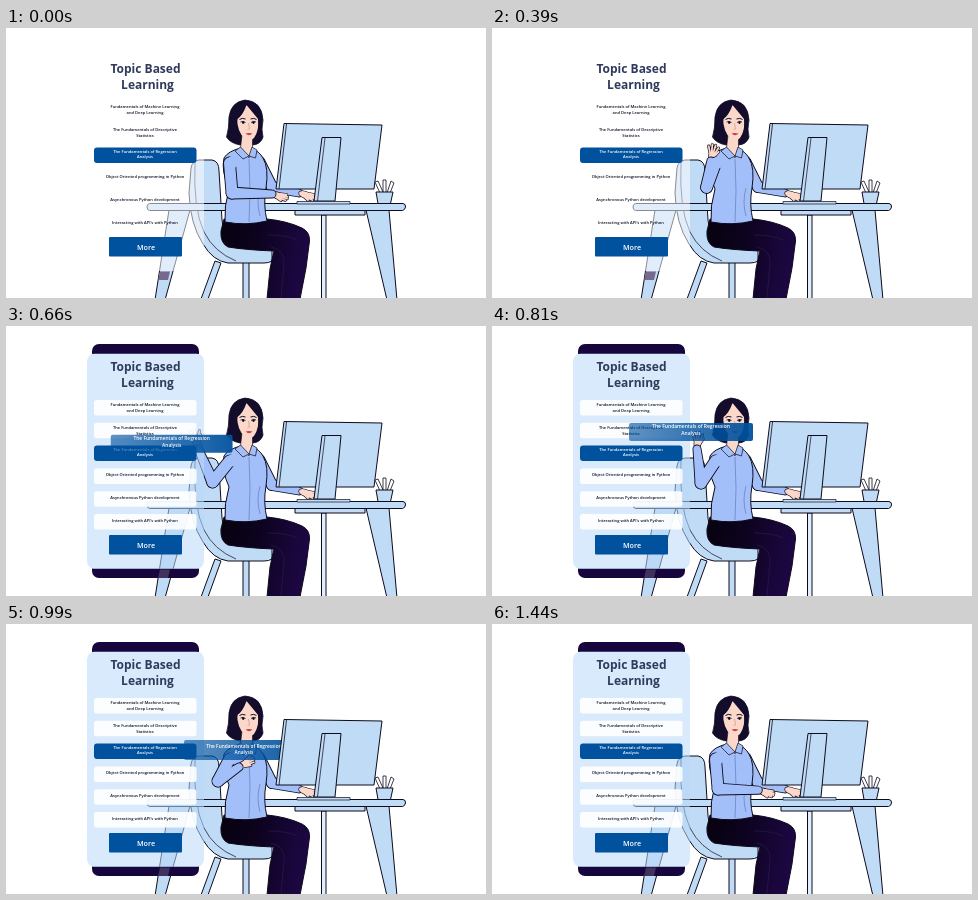
An HTML page with a canvas that plays this animation: 480x270 px, repeating every 1470 ms.

```html
<!DOCTYPE html>
<html lang="en">
<head>
<meta charset="utf-8">
<style>
html, body { margin: 0; width: 100%; height: 100%; overflow: hidden; background: #fff; }
canvas { display: block; width: 480px; height: 270px; }
</style>
</head>
<body>
<canvas></canvas>
<script>
const LOOP = 1470, STEP = 30;
const INK = '#0d0b1c', PALE = '#c0dbf6', SHIRT = '#a3bffa', SKIN = '#fcd8ca';
const HAIR = '#130c2b', PHONE = '#17053d', BLUE = '#00519e';
const FONT = '"Open Sans", "Noto Sans", sans-serif';

const canvas = document.querySelector('canvas');
const ctx = canvas.getContext('2d');
const ratio = window.devicePixelRatio || 1;
canvas.width = 480 * ratio;
canvas.height = 270 * ratio;

const PANTS = ctx.createLinearGradient(215, 200, 300, 215);
PANTS.addColorStop(0, '#07020f');
PANTS.addColorStop(.45, '#0d031f');
PANTS.addColorStop(1, '#1c0742');

// time, elbow x/y, wrist x/y, fingertip x/y, finger spread
const ARM = [
  [0, 226, 165, 266, 166, 282, 170, .08],
  [240, 223, 163, 249, 142, 265, 131, .12],
  [540, 207, 156, 193, 127, 185, 107, .3],
  [810, 209, 157, 205, 123, 206, 106, .2],
  [990, 212, 157, 233, 143, 248, 134, .12],
  [1140, 223, 164, 252, 156, 269, 150, .08],
  [1380, 226, 165, 266, 166, 282, 170, .08],
  [1470, 226, 165, 266, 166, 282, 170, .08]
];
// time, x, y, width, height
const BANNER = [
  [480, 88, 119, 103, 16],
  [540, 79, 118, 120, 18],
  [810, 137, 97, 124, 18],
  [990, 178, 116, 120, 20],
  [1140, 241, 136, 30, 16],
  [1230, 274, 148, 4, 4]
];
const ROWS = [
  ['Fundamentals of Machine Learning', 'and Deep Learning'],
  ['The Fundamentals of Descriptive', 'Statistics'],
  ['The Fundamentals of Regression', 'Analysis'],
  ['Object Oriented programming in Python'],
  ['Asynchronous Python development'],
  ["Interacting with API's with Python"]
];

function pose(keys, t, smooth) {
  let i = 0;
  while (i < keys.length - 2 && t >= keys[i + 1][0]) i++;
  const a = keys[i], b = keys[i + 1];
  const before = keys[Math.max(i - 1, 0)], after = keys[Math.min(i + 2, keys.length - 1)];
  const span = b[0] - a[0], u = (t - a[0]) / span;
  return a.slice(1).map((p, k) => {
    const q = b[k + 1];
    if (!smooth) return p + (q - p) * u;
    const m = (q - before[k + 1]) / (b[0] - before[0]) * span * (i > 0);
    const n = (after[k + 1] - p) / (after[0] - a[0]) * span;
    return p + u * (m + u * (3 * (q - p) - 2 * m - n + u * (2 * (p - q) + m + n)));
  });
}

function shape(d, fill, stroke = INK, width = 1) {
  const path = new Path2D(d);
  if (fill) { ctx.fillStyle = fill; ctx.fill(path); }
  if (stroke) { ctx.strokeStyle = stroke; ctx.lineWidth = width; ctx.stroke(path); }
}

function box(x, y, w, h, r, fill) {
  ctx.beginPath();
  ctx.roundRect(x, y, w, h, r);
  ctx.fillStyle = fill;
  ctx.fill();
}

function dot(x, y, rx, ry, fill) {
  ctx.beginPath();
  ctx.ellipse(x, y, rx, ry, 0, 0, 7);
  ctx.fillStyle = fill;
  ctx.fill();
}

function text(str, x, y, size, color, weight = 400) {
  ctx.font = `${weight} ${size}px ${FONT}`;
  ctx.textAlign = 'center';
  ctx.textBaseline = 'alphabetic';
  ctx.fillStyle = color;
  ctx.fillText(str, x, y);
}

function lines(rows, x, mid, size, color) {
  const gap = size * 1.37;
  rows.forEach((row, i) =>
    text(row, x, mid + size * .33 + (i - (rows.length - 1) / 2) * gap, size, color, 600));
}

// Tapered capsule between two joints
function limb(x1, y1, r1, x2, y2, r2) {
  const a = Math.atan2(y2 - y1, x2 - x1), h = Math.PI / 2;
  const path = new Path2D();
  path.arc(x1, y1, r1, a + h, a - h);
  path.arc(x2, y2, r2, a - h, a + h);
  path.closePath();
  return path;
}

function sleeve(parts) {
  ctx.strokeStyle = INK;
  ctx.lineWidth = 1.8;
  parts.forEach(p => ctx.stroke(p));
  ctx.fillStyle = SHIRT;
  parts.forEach(p => ctx.fill(p));
}

function hand(wx, wy, tx, ty, spread) {
  const a = Math.atan2(ty - wy, tx - wx), len = Math.hypot(tx - wx, ty - wy);
  ctx.save();
  ctx.translate(wx, wy);
  ctx.rotate(a);
  ctx.lineCap = 'round';
  for (const [color, grow] of [[INK, 1.3], [SKIN, 0]]) {
    ctx.strokeStyle = color;
    ctx.lineWidth = 1.8 + grow;
    ctx.beginPath();
    for (let i = -1.5; i < 2; i++) {
      ctx.moveTo(len * .4, i * 1.3);
      ctx.lineTo(len * (1 - Math.abs(i) * .08) * Math.cos(i * spread),
                 i * 1.1 + len * .6 * Math.sin(i * spread));
    }
    ctx.moveTo(len * .2, 1.5);
    ctx.lineTo(len * .62, 3.2 + spread * 12);
    ctx.stroke();
    dot(len * .28, 0, len * .34 + grow / 2, 3 + grow / 2, color);
  }
  ctx.restore();
}

function chair() {
  shape('M209 233 L195 271 H202 L215 235Z', PALE);
  shape('M237 234 V271 H243 V234Z', PALE);
  shape('M185 140 Q186 133 193 132 H206 Q213 133 213 143 L216 192 Q218 216 232 220 H266 V233 Q263 235 258 235 H222 Q207 233 197 216 Q184 196 183 165Z', PALE);
  shape('M189 134 Q187 181 198 204 Q208 224 230 233', null, INK, .7);
}

function desk() {
  shape('M163 182 H184 L159 272 H149Z', PALE);
  shape('M360 182 H383 L391 272 H381Z', PALE);
  shape('M315.5 187 V271 H320 V187Z', '#e1effc');
  shape('M289 182 H359 V187 H289Z', PALE);
  shape('M143.500 175.500 H397 Q400 176 399.500 179 Q399 182 396.500 182.500 H143.500 Q141 182 141 179 Q141 176 143.500 175.500Z', PALE);
}

function body() {
  shape('M218 191 H261 Q281 193 296 200 Q304 204 303.500 213 L300 240 L294 271 H261 L264 241 Q266 231 268 223 Q241 222 222 219 Q214 215 215 203Z', PANTS, INK);
  shape('M265 219 Q279 222 278 236 L275 270 M262 207 Q281 207 291 212', null, '#2b1a4a', .7);

  sleeve([limb(253, 134, 5.5, 266, 159, 5), limb(266, 159, 5, 293, 165, 3.5)]);
  hand(294, 165, 309, 170, .08);

  shape('M235 120 Q222 123 218 130 Q215 143 223 161 Q218 178 219 194 Q240 198 261 193 Q257 176 260 160 Q263 140 257 130 Q253 123 246 121Z', SHIRT);
  shape('M243 131 Q245 162 243 194 M254 160 Q250 174 254 188', null, '#5b6fae', .6);
}

function head() {
  shape('M239 72 Q225 74 223 89 Q223 101 220.500 109 Q224 115 234 117 H247 Q255 116 257 109 Q255 102 257 92 Q256 73 239 72Z', HAIR, HAIR, .8);
  shape('M236 107 L234.500 120 L243 130 L246.500 121 L246.500 108Z', SKIN, INK, .6);
  shape('M231 88 Q232 77 242 77 Q252 79 252.500 91 Q253 103 248 110 Q243.500 114.500 239 110.500 Q231 105 231 88Z', SKIN, null);
  shape('M240.500 77 Q237 87 231.500 91 Q229 99 232 111 L223 112 L224 87 Q230 73 240 73 Q255 75 256 91 L255 111 L250 111 Q253 100 252 91 Q248 86 240.500 77Z', HAIR, null);
  shape('M233.500 91.500 Q236 89.500 239.500 91 M244.500 91 Q248 89.500 250.500 91.500', null, HAIR, 1);
  shape('M234.500 94 Q237 92.500 239.500 94.500 M245 94.500 Q247.500 92.500 250 94', null, INK, .8);
  dot(237.2, 94.6, 1.2, 1.3, INK);
  dot(247.5, 94.6, 1.2, 1.3, INK);
  shape('M242.500 95 L243.500 101 L241.500 101.500', null, '#c08d80', .6);
  shape('M239.500 105.500 Q243 104.500 246.500 105.500 Q243 109 239.500 105.500Z', '#cf3b47', null);
  shape('M234.500 119 L229 123 L237 131 L243 128Z M246 119 L251 122 L249.500 130 L243 128Z', SHIRT, INK, .7);
}

function arm(t) {
  const [ex, ey, wx, wy, tx, ty, spread] = pose(ARM, t, true);
  hand(wx, wy, tx, ty, spread);
  sleeve([limb(223.500, 135, 5.5, ex, ey, 5.5), limb(ex, ey, 5.5, wx, wy, 3.6)]);
  dot(226, 134.500, 6, 6, SHIRT);
}

function computer() {
  shape('M278 95.500 L376 97 L368 161 L270 161Z', PALE);
  shape('M280.500 96 L273 161', null, INK, .8);
  shape('M316 109.500 H335 L329 173 H308Z', PALE);
  shape('M319 110 L311.500 173', null, INK, .7);
  shape('M291 173.500 H344 V176 H291Z', PALE, INK, .7);
  shape('M374 165 L369 154 L372 153 L377 164 M377 165 V152 H380 V165 M381 165 L385 153 L388 155 L384 165', '#fff', INK, .8);
  shape('M370 164 H387 L384.500 175.500 H372Z', PALE);
}

function phone(t) {
  const lit = t >= 555, outlined = t >= 480 && !lit;
  if (lit) {
    box(86, 18, 107, 10, [7, 7, 0, 0], PHONE);
    box(86, 242.500, 107, 9.500, [0, 0, 7, 7], PHONE);
  }
  shape('M154 243.500 H164 L162 252 H152Z', lit ? '#40325f' : '#75698e', null);
  box(81, 27.500, 117, 215.500, 8, lit ? 'rgba(186,217,248,.56)' : 'rgba(255,255,255,.52)');
  if (outlined) {
    shape('M86.500 27 V24 Q87 19.500 92 19.500 H187 Q192.500 19.500 193 24 V27 M86.500 244 V247 Q87 251.500 92 251.500 H187 Q192.500 251.500 193 247 V244', null, PHONE, .8);
    shape('M89 28.500 Q81.500 28.500 81.500 36 V234 Q81.500 242 89 242 M190 28.500 Q197.500 28.500 197.500 36 V234 Q197.500 242 190 242', null, '#d9e6f5', .7);
  }
  text('Topic Based', 139.5, 45.3, 12, '#303b5c', 700);
  text('Learning', 141.5, 60.8, 12, '#303b5c', 700);
  ROWS.forEach((rows, i) => {
    const y = 74 + i * 22.8, active = i === 2;
    if (active) box(88, 119.5, 102.5, 15.5, 3, BLUE);
    else if (lit) box(88, y, 102.5, 15.5, 2.5, 'rgba(255,255,255,.9)');
    const mid = active ? 126 : y + (rows.length > 1 ? 7.8 : 6.3);
    lines(rows, 139, mid, 4.05, active ? '#fff' : '#0c1122');
  });
  box(103, 209, 73, 19.500, 1, BLUE);
  text('More', 140, 221.800, 7.2, '#fff', 600);
}

function banner(t) {
  if (t < 480 || t >= 1230) return;
  const [x, y, w, h] = pose(BANNER, t);
  const moving = t > 600 && t < 930;
  const fade = ctx.createLinearGradient(x, 0, x + w, 0);
  fade.addColorStop(0, 'rgba(0,81,158,.62)');
  fade.addColorStop(1, 'rgba(0,81,158,.95)');
  ctx.save();
  box(x, y, w, h, 2, fade);
  ctx.beginPath();
  ctx.rect(x, y, w, h);
  ctx.clip();
  if (moving) ctx.filter = 'blur(.7px)';
  lines(ROWS[2], x + w / 2, y + h / 2 - (moving ? 2 : .5), Math.max(.5, w / 25), '#fff');
  ctx.restore();
}

function draw(now) {
  const t = Math.floor((now % LOOP) / STEP) * STEP;
  ctx.setTransform(ratio, 0, 0, ratio, 0, 0);
  ctx.fillStyle = '#fff';
  ctx.fillRect(0, 0, 480, 270);
  ctx.lineJoin = 'round';
  chair();
  desk();
  body();
  head();
  arm(t);
  phone(t);
  banner(t);
  computer();
}

const start = performance.now();
function frame() {
  draw(performance.now() - start);
  requestAnimationFrame(frame);
}
frame();
</script>
</body>
</html>
```
